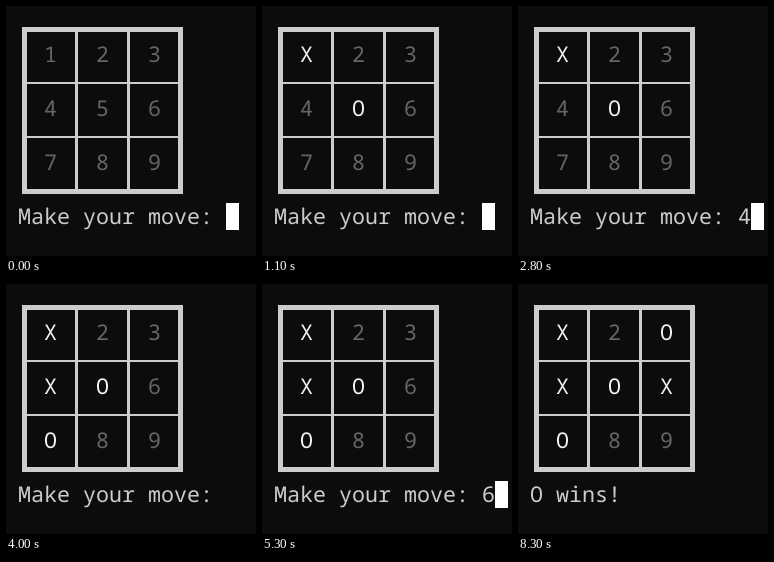
An HTML page for the animation above (8.4 s loop, 250 px wide and 250 px high).

```html
<!DOCTYPE html>
<html lang="en">
<head>
<meta charset="utf-8">
<title>Noughts and crosses</title>
<style>
html, body { margin: 0; width: 100%; height: 100%; overflow: hidden; background: #0c0c0c; }
svg { display: block; width: 100vw; height: 100vh; }
text {
  font: 21.667px "Noto Sans Mono", "DejaVu Sans Mono", monospace;
  fill: #ccc;
  white-space: pre;
  text-rendering: geometricPrecision;
}
.free { fill: #666; }
.taken { fill: #f2f2f2; }
</style>
</head>
<body>
<svg id="stage" viewBox="0 0 250 250">
  <rect width="250" height="250" fill="#0c0c0c"/>
  <rect x="18.5" y="23.5" width="156" height="162" fill="none" stroke="#ccc" stroke-width="5"/>
  <path d="M70.5 24V185M122.5 24V185" stroke="#ccc" stroke-width="3"/>
  <path d="M19 77H174M19 131H174" stroke="#ccc" stroke-width="2"/>
  <text id="line" x="12" y="218"></text>
  <rect id="cursor" y="197" width="13" height="27" fill="#fff"/>
</svg>
<script>
const LOOP = 8400, CHAR = 13, LEFT = 12;
const PROMPT = 'Make your move: ';
const stage = document.getElementById('stage');
const line = document.getElementById('line');
const cursor = document.getElementById('cursor');

// Each entry: start time, board, typed key, cursor visible
const steps = [
  [0, '123456789', '', true],
  [100, '123456789', '', false],
  [500, '123456789', '1', true],
  [1100, 'X234O6789', '', true],
  [1800, 'X234O6789', '', false],
  [2300, 'X234O6789', '', true],
  [2800, 'X234O6789', '4', true],
  [3300, 'X23XO6O89', '', true],
  [4000, 'X23XO6O89', '', false],
  [4500, 'X23XO6O89', '', true],
  [5000, 'X23XO6O89', '', false],
  [5300, 'X23XO6O89', '6', true],
  [5700, 'X2OXOXO89', null, false]
];

const cells = Array.from({ length: 9 }, (_, i) => {
  const cell = document.createElementNS('http://www.w3.org/2000/svg', 'text');
  cell.setAttribute('x', 38 + (i % 3) * 52);
  cell.setAttribute('y', 56 + Math.floor(i / 3) * 54);
  return stage.appendChild(cell);
});

let shown = null;

function show([, board, key, visible]) {
  cells.forEach((cell, i) => {
    cell.textContent = board[i];
    cell.setAttribute('class', /\d/.test(board[i]) ? 'free' : 'taken');
  });
  const text = key === null ? 'O wins!' : PROMPT + key;
  line.textContent = text;
  cursor.setAttribute('x', LEFT + text.length * CHAR);
  cursor.setAttribute('visibility', visible ? 'visible' : 'hidden');
}

const start = performance.now();

function frame() {
  const t = (performance.now() - start) % LOOP;
  const step = steps.filter(s => s[0] <= t).pop();
  if (step !== shown) show(shown = step);
  requestAnimationFrame(frame);
}
frame();
</script>
</body>
</html>
```
